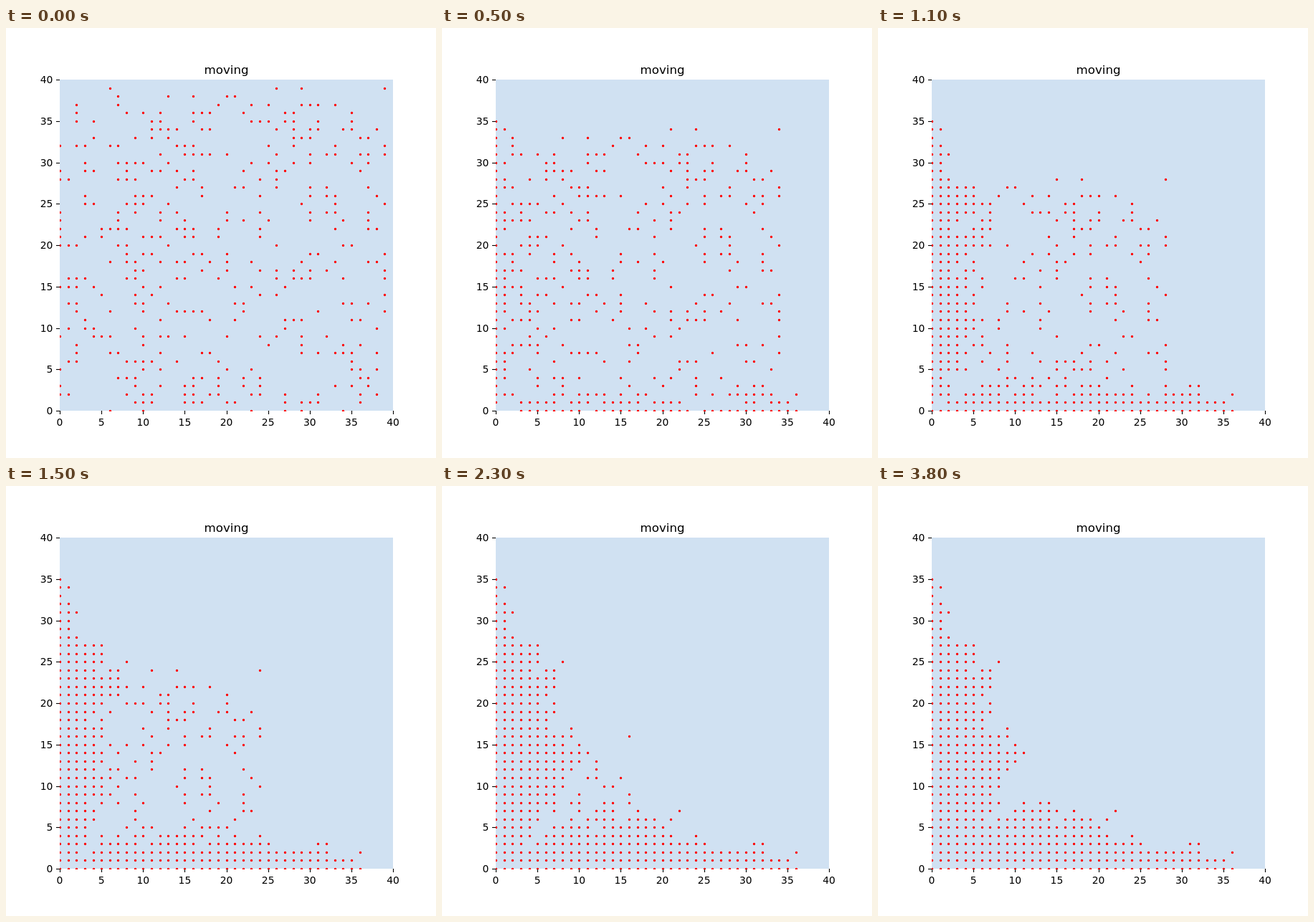
An HTML page with a canvas that plays this animation: 600x600 px, repeating every 4.1 s.

```html
<!DOCTYPE html>
<html lang="en">
<head>
<meta charset="utf-8">
<title>moving</title>
<style>
  html, body { margin: 0; width: 100%; height: 100%; overflow: hidden; background: #fff; }
  canvas { display: block; }
</style>
</head>
<body>
<canvas id="stage" width="600" height="600"></canvas>
<script>
const ctx = document.getElementById('stage').getContext('2d');
const SIZE = 40, STEP_MS = 100, STEPS = 41;
const LEFT = 75, TOP = 72, WIDTH = 465, HEIGHT = 462;

// Dots per diagonal: x - y = 0, 1, 2, ... and y - x = 1, 2, 3, ...
const below = [9, 6, 7, 9, 8, 9, 9, 8, 8, 6, 8, 7, 7, 7, 6, 8, 5, 5, 4, 4,
  5, 4, 4, 3, 3, 3, 3, 3, 4, 4, 3, 2, 2, 2, 3, 1, 1];
const above = [8, 9, 12, 11, 11, 9, 10, 10, 8, 7, 7, 8, 8, 6, 8, 8, 9, 7, 5,
  6, 6, 6, 5, 4, 3, 3, 2, 2, 3, 2, 2, 1, 2, 1, 1];

// Centre of a grid position, snapped to the pixel grid
const px = x => Math.round(LEFT + x * WIDTH / SIZE) + 0.5;
const py = y => Math.round(TOP + HEIGHT - y * HEIGHT / SIZE) + 0.5;

let seed = 2024;
function random() {
  seed = (seed + 0x6D2B79F5) | 0;
  let t = Math.imul(seed ^ (seed >>> 15), 1 | seed);
  t = (t + Math.imul(t ^ (t >>> 7), 61 | t)) ^ t;
  return ((t ^ (t >>> 14)) >>> 0) / 4294967296;
}

// Scatter the dots of one diagonal evenly; rank is the final place in the queue
const dots = [];
function scatter(dx, dy, count) {
  const length = SIZE - dx - dy;
  for (let start = 0, rank = 0; rank < count; start++) {
    if (random() < (count - rank) / (length - start)) {
      dots.push({ dx, dy, start, rank });
      rank++;
    }
  }
}
below.forEach((count, i) => scatter(i, 0, count));
above.forEach((count, i) => scatter(0, i + 1, count));

function drawAxes() {
  ctx.fillStyle = '#fff';
  ctx.fillRect(0, 0, 600, 600);
  ctx.fillStyle = '#d0e1f2';
  ctx.fillRect(LEFT, TOP, WIDTH, HEIGHT);

  ctx.fillStyle = '#000';
  ctx.textAlign = 'center';
  ctx.font = '16.67px "DejaVu Sans", sans-serif';
  ctx.fillText('moving', LEFT + WIDTH / 2, 64);
  ctx.font = '13.89px "DejaVu Sans", sans-serif';
  for (let v = 0; v <= SIZE; v += 5) {
    ctx.fillRect(px(v) - 0.55, TOP + HEIGHT, 1.1, 5);
    ctx.fillRect(LEFT - 5, py(v) - 0.55, 5, 1.1);
    ctx.textAlign = 'center';
    ctx.fillText(v, LEFT + v * WIDTH / SIZE, 555);
    ctx.textAlign = 'right';
    ctx.fillText(v, 65.3, Math.round(py(v) + 4.6));
  }
}

function drawDots(step) {
  ctx.save();
  ctx.beginPath();
  ctx.rect(LEFT, TOP, WIDTH, HEIGHT + 1);
  ctx.clip();
  ctx.fillStyle = '#f00';
  ctx.beginPath();
  for (const { dx, dy, start, rank } of dots) {
    const along = Math.max(rank, start - step);
    const x = px(dx + along), y = py(dy + along);
    ctx.moveTo(x + 1.72, y);
    ctx.arc(x, y, 1.72, 0, 2 * Math.PI);
  }
  ctx.fill();
  ctx.restore();
}

function draw() {
  drawAxes();
  drawDots(Math.floor(performance.now() / STEP_MS) % STEPS);
  requestAnimationFrame(draw);
}
draw();
</script>
</body>
</html>
```
